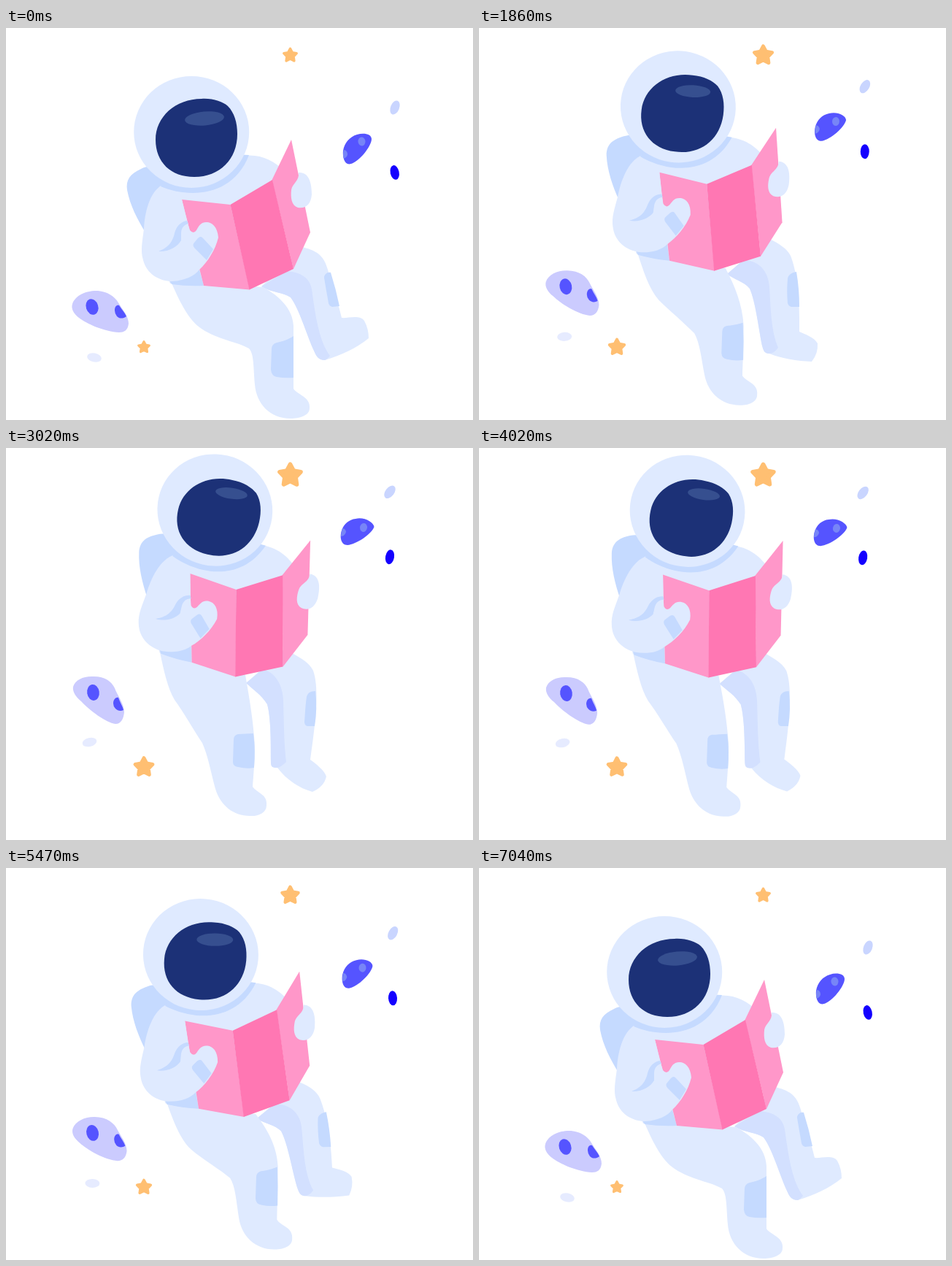
Write an HTML page with a canvas that moves like this. It is 640x537 px and loops after 7080 ms.

```html
<!DOCTYPE html>
<html lang="en">
<head>
<meta charset="utf-8">
<title>Reading astronaut</title>
<style>
html, body { margin: 0; width: 100%; height: 100%; overflow: hidden; background: #fff; }
canvas { display: block; }
</style>
</head>
<body>
<canvas id="stage" width="640" height="537"></canvas>
<script>
const ctx = document.getElementById('stage').getContext('2d');
const LOOP = 7080, HALF = 3510, LEAD = 45, MID = 0.59;
const SUIT = '#dfeaff', SHADE = '#c5daff', LEG_SHADE = '#d3e0ff';
const PINK = '#ff97c9', HOT = '#ff77b3', BLUE = '#5554ff', GOLD = '#ffbf72';

let u = 0; // 0 = leaning back, 1 = almost upright

const mix = (a, b) => a + (b - a) * u;

// Blend path strings that share one structure; a third pose sits at u = MID.
function blend(poses) {
  if (poses.length < 2) return poses[0];
  const w = poses.length === 2
    ? [1 - u, u]
    : [(u - MID) * (u - 1) / MID, u * (u - 1) / (MID * (MID - 1)), u * (u - MID) / (1 - MID)];
  const nums = poses.map(s => s.match(/[\d.]+/g));
  let i = 0;
  return poses[0].replace(/[\d.]+/g, () => {
    const v = w.reduce((sum, k, j) => sum + k * nums[j][i], 0);
    i++;
    return v.toFixed(2);
  });
}

function shape(color, ...poses) {
  ctx.fillStyle = color;
  ctx.fill(new Path2D(blend(poses)));
}

function oval(color, x, y, rx, ry, deg = 0) {
  ctx.fillStyle = color;
  ctx.beginPath();
  ctx.ellipse(x, y, rx, ry, deg * Math.PI / 180, 0, 7);
  ctx.fill();
}

function star(x, y, width) {
  ctx.save();
  ctx.translate(x, y);
  ctx.scale(width / 20.6, width / 20.6);
  ctx.beginPath();
  for (let i = 0; i < 10; i++) {
    const r = i % 2 ? 4.7 : 9, a = i * Math.PI / 5;
    ctx.lineTo(r * Math.sin(a), -r * Math.cos(a));
  }
  ctx.closePath();
  ctx.fillStyle = ctx.strokeStyle = GOLD;
  ctx.lineWidth = 3.4;
  ctx.lineJoin = 'round';
  ctx.fill();
  ctx.stroke();
  ctx.restore();
}

function drawSpace() {
  star(389.5, 37.5, mix(21, 34.8));
  star(189, 437.3, mix(17.8, 29));
  oval('#c9d5ff', mix(533, 526), mix(109, 60.3), 6, 10, mix(22, 38));
  oval('#1400ff', mix(532.7, 526), mix(198, 149.3), 6, 10, mix(-12, 10));
  oval('#e6ebff', mix(121, 114.5), mix(451.5, 403), 10, 6, mix(12, -14));

  shape(BLUE,
    'M481 146C490 143 501 145 501 152C501 162 484 183 473 186C464 189 461 177 462 168C464 157 471 149 481 146Z',
    'M479 97C491 94 504 102 504.5 108C501 118 480 132 468 133C459 133 457 122 460 113C463 104 470 98 479 97Z');
  oval('#7785f7', mix(487.5, 490), mix(155.5, 109), 5, 6, mix(-5, 10));
  shape('#7785f7',
    'M463 167C466 167 468 170 468 173C468 176 465 178 463 179Q461 174 463 167Z',
    'M461 110C464 110 466 113 466 115C465 118 463 121 459 121Q459 115 461 110Z');

  shape('#cbcbfe',
    'M123 360C140 360 151 370 155 378C160 386 168 395 168 405C167 414 162 417 155 417C135 416 110 405 100 397C92 391 89 384 91 378C95 366 110 360 123 360Z',
    'M117 313C135 312 145 320 149 329C152 338 162 350 162 362C161 372 157 378 150 378C137 376 115 360 103 347C95 340 91 334 92 327C95 318 105 313 117 313Z');
  oval(BLUE, mix(118, 119.5), mix(382, 335), 8.3, 11, mix(-18, -8));
  shape(BLUE,
    'M149 387C149 381 152 379 155 380C158 385 163 390 165 395C160 399 155 398 152 395Q149 391 149 387Z',
    'M147 350C147 344 151 341 154 342C156 348 160 354 161 359C157 361 153 360 150 357Q147 354 147 350Z');
}

// Back edge of the far leg, shared by its outline and its shading.
const CALF = [
  'C428 455 425 449 422 442C412 420 402 385 390 369C380 362 365 363 350 354Z',
  'C391 446 390 442 388 435C383 410 379 375 371 357C363 347 350 345 340 337Z',
  'C365 438 363 437 363 430C363 400 363 370 358 351C350 338 340 332 329 322Z'
];
const withCalf = fronts => fronts.map((s, i) => s + CALF[i]);

function drawFarLeg() {
  shape(SUIT, ...withCalf([
    'M405 300C424 304 435 311 440 328C447 350 454 372 460 397C468 398 485 392 491 401Q497 412 497 425C480 439 460 448 437 455',
    'M398 289C411 295 423 303 427 312C434 330 440 360 439 416C446 419 460 424 464 432Q465 446 456 457C436 456 415 453 398 446',
    'M382 275C400 286 415 292 421 305C428 325 427 360 417 427C424 432 437 442 439 450Q436 464 420 471C402 466 385 455 372 438'
  ]));
  shape(LEG_SHADE, ...withCalf([
    'M385 333C408 335 419 345 420 365C425 400 430 430 444 449Q440 454 437 455',
    'M362 318C385 318 397 335 398 355C400 385 400 415 410 438Q404 446 398 446',
    'M352 303C370 308 379 325 380 345C381 380 381 405 384 430Q377 437 372 438'
  ]));
  shape(SHADE,
    'M445 335C440 334 436 338 436 342C438 355 440 365 442 377Q443 381 447 382L457 381Q452 357 445 335Z',
    'M435 334C428 335 423 339 423 344C422 355 422 365 423 377Q424 381 428 382L439 382Q439 357 435 334Z',
    'M424 333C417 333 413 336 412 341C410 355 410 365 409 375Q409 380 413 381L423 381Q427 357 424 333Z');
}

function drawNearLeg() {
  shape(SUIT,
    'M225 345C238 375 250 400 268 412C290 427 318 430 333 439C340 446 339 465 341 488C343 515 362 535 390 535C402 535 416 531 416 521C418 505 398 502 394 494C394 470 394 440 394 408C393 385 375 367 352 355Z',
    'M211 280C216 303 221 328 231 345C243 361 258 388 269 404C277 422 281 445 287 467C294 490 312 504 334 504C345 505 357 500 357 490C359 474 344 473 338 464C339 450 341 430 341 408C339 375 334 345 328 311Z');
  shape(SHADE,
    'M394 422C387 427 377 430 371 431Q364 433 364 440L363 468Q364 477 371 478Q382 480 394 479Q394 450 394 422Z',
    'M339 391C333 391 324 392 318 392Q312 393 312 400L311 430Q311 436 318 437Q330 440 340 438Q342 415 339 391Z');
}

function drawBook() {
  shape(PINK, 'M241 235L307.5 242L334 358.5L271 353Z');
  shape(PINK, 'M364.5 208L391 153L417 280L394 330Z');
  shape(HOT, 'M307.5 242L365 208L394 330L333.5 358.5Z');
}

function drawHead() {
  shape(SHADE, 'M333 174C318 213 286 226 256 226C240 226 223 222 212 217L240 170Z');
  oval(SUIT, 254.2, 142.5, 79, 76.5);
  shape('#1c3177', 'M268 97C283 96 297 101 304 107C313 116 317 130 317 145C317 180 293 204 258 204C226 204 205 184 205 153C205 122 232 97 268 97Z');
  oval('#364f8f', mix(272, 271), mix(124, 115), mix(27, 22), mix(9.5, 7.5), -5);
}

function turnBody() {
  ctx.translate(mix(307, 315), mix(242, 194));
  ctx.rotate(mix(0, 13.2) * Math.PI / 180);
  ctx.translate(-307, -242);
}

function drawBody() {
  shape(SUIT, 'M214 215L326 175C348 172 368 182 380 195L365 330L333 350L271 350L225 350L200 290Z');
  shape(SHADE, 'M222 342L264 328L271 353Q248 354 227 351Z');
  drawBook();
  // near arm and hand
  shape(SUIT, 'M214 215C196 225 190 255 189 275C187 292 184 305 188 318C193 337 210 347 228 347C245 346 258 340 265 331C276 321 287 304 291 287C290 272 282 266 275 266C266 266 264 272 261 277Q257 283 252 277L248 264L241 235Z');
  shape(SHADE, 'M209 306C225 300 229 290 231 281C234 270 241 265 248 264L250 268C242 270 240 276 240 282L240 291C235 300 222 307 209 306Z');
  shape(SHADE, 'M263 288Q267 284 270 288L284 303L275 318L258 301Q255 297 258 294Z');
  // far hand
  shape(SUIT, 'M401 198C415 197 419 212 419 228C418 242 410 248 400 246C391 243 390 232 391 222C393 212 402 210 401 198Z');
  drawHead();
}

function inBody(draw) {
  ctx.save();
  turnBody();
  draw();
  ctx.restore();
}

function frame(now) {
  const t = now % LOOP;
  u = (1 - Math.cos(Math.PI * (t + LEAD) / HALF)) / 2 * 1.041;
  ctx.fillStyle = '#fff';
  ctx.fillRect(0, 0, 640, 537);
  drawSpace();
  inBody(() => shape(SHADE, 'M215 200C208 188 195 188 185 193C170 200 164 208 166 222C170 243 180 262 191 280L230 250Z'));
  drawFarLeg();
  drawNearLeg();
  inBody(drawBody);
}

const start = performance.now();
function tick() {
  frame(performance.now() - start);
  requestAnimationFrame(tick);
}
tick();
</script>
</body>
</html>
```
